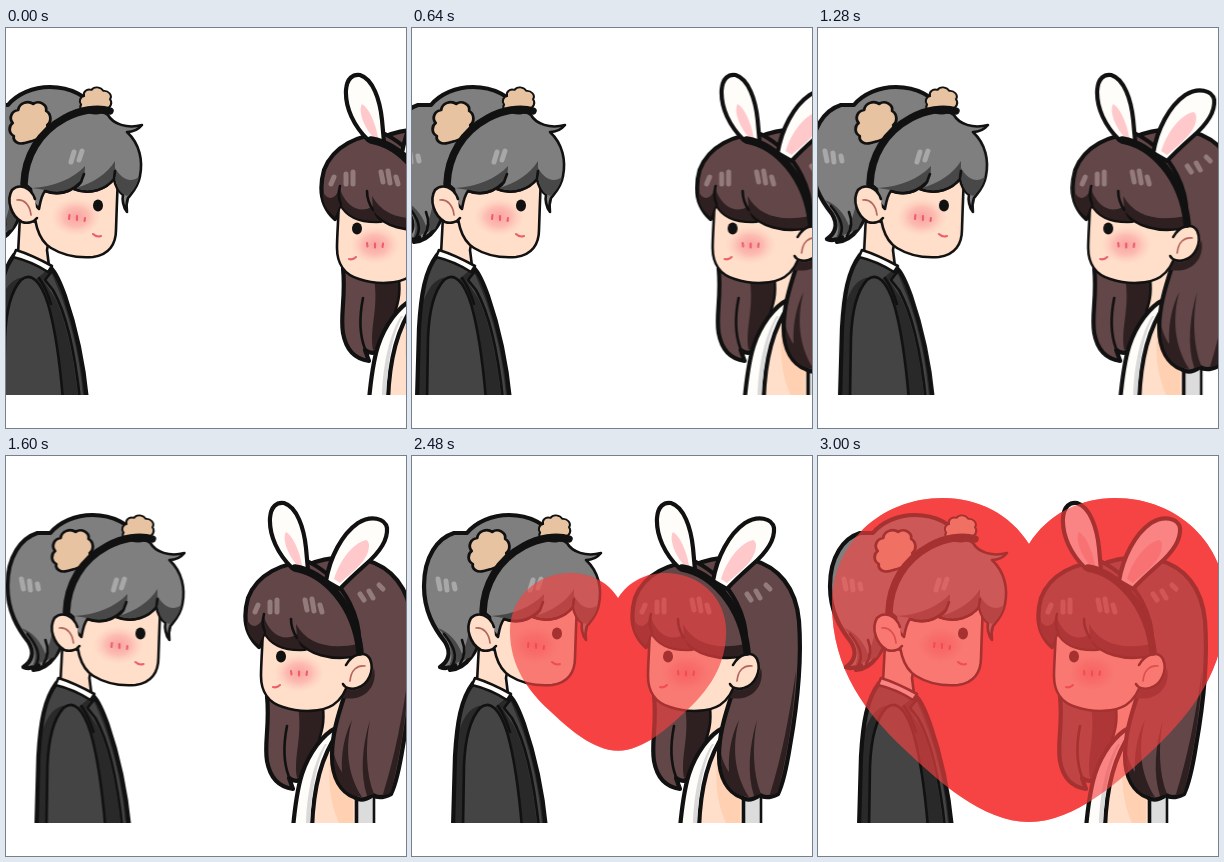
Write an HTML page that moves like this. It is 400 px wide and 400 px high and loops after 3680 ms.

```html
<!DOCTYPE html>
<html lang="en">
<head>
<meta charset="utf-8">
<title>Couple and heart</title>
<style>
  html, body { margin: 0; width: 100%; height: 100%; overflow: hidden; background: #fff; }
  svg { display: block; width: 100vw; height: 100vh; }
  .boy, .girl, .heart { animation: 3680ms infinite; }
  .boy { animation-name: boy; }
  .girl { animation-name: girl; }
  .heart { animation-name: heart; transform-origin: 200px 208px; fill: #f64343; }
  .veil { opacity: .65; }

  /* slide ends at 2000 ms, heart grows until 3000 ms, 40 ms per step */
  @keyframes boy {
    0% { transform: translateX(-51px); animation-timing-function: steps(50, end); }
    54.3478%, 100% { transform: translateX(2px); }
  }
  @keyframes girl {
    0% { transform: translateX(91px); animation-timing-function: steps(50, end); }
    54.3478%, 100% { transform: translateX(-4px); }
  }
  @keyframes heart {
    0%, 54.3477% { transform: scale(0); animation-timing-function: step-end; }
    54.3478% { transform: scale(.132); animation-timing-function: steps(25, end); }
    81.5217%, 100% { transform: scale(1); }
  }

  .ink { stroke: #111; stroke-width: 2.6; stroke-linejoin: round; stroke-linecap: round; }
  .bold { stroke-width: 4.2; }
  .line { fill: none; }
  .band { fill: none; stroke: #111; stroke-width: 7.5; stroke-linecap: round; }
  .skin { fill: #ffdfca; }
  .gray { fill: #7f7f7f; }
  .grayDark { fill: #484848; }
  .suit { fill: #444; }
  .suitDark { fill: #292929; }
  .brown { fill: #624648; }
  .brownDark { fill: #2e2021; }
  .tan { fill: #e8c3a2; }
  .white { fill: #fffdfa; }
  .pink { fill: #ffc9cc; }
  .shine { fill: none; stroke-width: 5; stroke-linecap: round; }
  .boy .shine { stroke: #a8a8a8; }
  .girl .shine { stroke: #937a7b; }
  .mark { fill: none; stroke: #ec5f68; stroke-width: 2.1; stroke-linecap: round; }
  .fold { fill: none; stroke: #b5655c; stroke-width: 1.7; stroke-linecap: round; }
</style>
</head>
<body>
<svg viewBox="0 0 400 400">
  <defs>
    <radialGradient id="blush">
      <stop offset="0" stop-color="#f77f88" stop-opacity=".65"/>
      <stop offset=".5" stop-color="#f98f93" stop-opacity=".45"/>
      <stop offset="1" stop-color="#ffb5ab" stop-opacity="0"/>
    </radialGradient>
    <clipPath id="floor"><rect width="400" height="367"/></clipPath>
    <path id="love" d="M211 88C192 58 160 42 125 42C62 42 14 88 14 148C14 215 50 258 84 291C120 325 165 366 211 366C257 366 302 325 338 291C372 258 408 215 408 148C408 88 360 42 297 42C262 42 230 58 211 88Z"/>
    <path id="fluff" d="M-5 21C-11 23-16 19-15 14C-20 11-20 4-16 1C-20-4-17-11-11-12C-10-19-2-22 3-18C8-22 16-18 15-11C20-8 20 0 16 3C18 8 15 12 11 13C8 18 2 19-5 21Z"/>
  </defs>

  <use href="#love" class="heart"/>

  <g clip-path="url(#floor)">
    <g class="boy">
      <!-- back hair -->
      <path class="gray ink bold" d="M40 77C24 82 10 100 10 130C10 155 20 172 31 186C37 196 35 205 26 211C31 213 36 212 41 209L36 214C45 213 52 208 57 201C62 195 64 188 68 180L150 90C132 66 114 59 95 59C78 59 62 66 53 77Z"/>
      <path class="grayDark" d="M24 172C36 184 41 198 35 210L57 201L67 180L58 160C55 178 52 190 48 198C44 186 35 176 24 172Z"/>
      <path class="ink line" d="M30 178C40 190 44 200 38 210M48 184C52 194 50 202 46 208"/>
      <path class="shine" d="M24 123L26 133M32 125L33 134M40 128L41 133"/>

      <!-- neck and suit -->
      <path class="skin ink" d="M65 188L63 226L94 238L92 222L96 200Z"/>
      <path class="suitDark ink bold" d="M59 227C47 243 43 266 41 300L39 372H132C129 340 121 300 110 268C105 254 101 245 96 240Z"/>
      <path class="suit" d="M60 230C52 240 48 256 46 272C54 250 66 246 80 252L92 242Z"/>
      <path class="suit ink" d="M49 372L50 310C51 284 55 264 66 252C76 243 86 254 93 276C100 300 105 336 108 372Z"/>
      <path class="suit" d="M100 270C111 292 119 330 123 368H128C125 330 116 294 106 268L97 246L88 252Z"/>
      <path class="ink line" d="M97 243L90 252L98 262C111 285 120 325 125 372M84 250C89 257 93 266 96 276"/>
      <path class="white ink" d="M61 222L58 229C71 232 82 237 93 244L97 238C86 232 74 226 61 222Z"/>

      <!-- face -->
      <path class="skin ink" d="M78 160C78 195 83 212 96 220C109 228 125 230 138 229C154 227 161 216 161 202C161.500 188 162 170 163 150L120 120Z"/>
      <ellipse cx="121" cy="189" rx="25" ry="19" fill="url(#blush)"/>
      <path class="mark" d="M114.500 187L114 191M122 188V192M130 190L129.500 193"/>
      <path class="mark" d="M138 206C140 208 143 209 146 208"/>
      <ellipse cx="143" cy="177.500" rx="5" ry="6" fill="#111"/>

      <!-- fringe -->
      <path class="gray ink" d="M70 156C72 128 86 102 115 88C130 81 146 82 153 87C158 96 172 101 187 97C183 102 178 104 172 104C185 116 188 133 185 148C183 160 176 166 173 170C171 176 171 179 172 184C168 179 167 171 168 167C163 163 160 157 159 151C152 160 136 168 119 161C122 159 125 156 126 154C116 164 104 168 90 163C86 168 85 176 84 181C78 176 76 168 76 161Z"/>
      <path class="grayDark" d="M77 160C98 159 118 151 130 138C130 147 128 152 126 154C116 163 104 166 90 162ZM121 160C138 155 152 146 160 133C160 141 160 147 159 150C152 159 136 166 121 160ZM160 140C167 152 176 155 184 149C182 159 176 165 172 168L168 166C163 162 160 156 160 140Z"/>
      <path class="ink line" d="M90 163C104 168 116 164 126 154L129 146M119 161C136 168 152 160 159 151L160 143"/>
      <path class="shine" d="M119 124L116 134M127 123L124 132"/>

      <!-- ear, band, fluffy ears -->
      <path class="skin ink" d="M80 171C76 159 64 155 57 162C51 172 56 188 67 194C73 196 79 194 82 190"/>
      <path class="fold" d="M62 172C69 171 75 177 76 187"/>
      <use href="#fluff" class="tan ink" transform="translate(75 94) scale(1.08 1)"/>
      <use href="#fluff" class="tan ink" transform="translate(141 73) rotate(25) scale(.8 .68)"/>
      <path class="band" d="M69 156C70 128 84 104 110 90C125 82 142 79 155 83"/>
    </g>

    <g class="girl">
      <!-- lock behind the shoulder -->
      <path class="brown ink bold" d="M246 240C249 268 243 288 246 305C249 322 258 331 272 333L268 322C277 329 284 322 288 312L306 280V240Z"/>
      <path class="brownDark" d="M277 250C282 282 272 300 276 322C283 320 287 313 289 309L304 284V250Z"/>
      <path class="ink line" d="M266 270C262 290 263 308 268 321"/>

      <!-- neck, dress, arm -->
      <path class="skin ink" d="M301 245C304 262 302 272 298 284L320 300L330 235Z"/>
      <path fill="#dcdcdc" class="ink" d="M336 330V372H353V330Z"/>
      <path class="skin ink" d="M313 276C300 296 292 330 290 372H335V300Z"/>
      <path fill="#ffd0b2" d="M310 298C306 322 309 348 318 367H332V320C322 316 314 308 310 298Z"/>
      <path class="white ink bold" d="M315 272C302 278 288 297 281 318C276 334 274 350 272 372H291C292 340 298 303 317 277Z"/>
      <path fill="#d9d9d9" d="M304 288C293 305 286 335 285 367H289C291 338 294 308 306 288Z"/>

      <!-- long hair -->
      <path class="brown ink bold" d="M278 113C300 101 325 99 345 104C370 111 388 131 391 165C394 205 390 245 382 290C378 315 374 330 370 338C362 342 356 342 352 339C345 344 338 345 333 341C320 336 311 322 311 300C311 280 316 262 324 238L326 200Z"/>
      <path class="brownDark" d="M388 215C381 262 374 300 362 338C366 339 368 338 370 336C378 305 386 260 388 215ZM331 264C324 290 326 318 341 341C322 340 312 322 313 298C315 306 318 312 321 316C320 298 323 280 331 264ZM349 264C344 290 345 318 353 338L346 340C339 318 341 290 349 264Z"/>
      <path class="brownDark" d="M318 230C334 240 348 232 353 212C357 230 344 246 322 242Z"/>
      <path class="shine" d="M339 138L343 144M348 135L352 142M358 129L362 133"/>

      <!-- face -->
      <path class="skin ink" d="M242 165C242 185 240 205 240 220C240 236 248 247 262 251C280 257 301 256 312 249C321 243 326 233 329 222L330 165L285 140Z"/>
      <ellipse cx="278" cy="217" rx="25" ry="19" fill="url(#blush)"/>
      <path class="mark" d="M270 215L270.500 218.500M278 215.500V219.500M286 215.500L285.500 219"/>
      <path class="mark" d="M252 231C255 232 257 231 259 229"/>
      <ellipse cx="260" cy="200.500" rx="5" ry="6" fill="#111"/>

      <!-- fringe -->
      <path class="brown ink bold" d="M288 106C262 106 236 118 227 142C222 160 224 178 238 191C239 185 241 180 244 176C250 188 264 194 284 193C279 190 277 186 276 182C286 197 310 205 337 199C343 165 325 125 288 106Z"/>
      <path class="brownDark" d="M226 164C231 173 238 172 243 160C246 168 245 174 243 177L238 189C229 182 225 174 226 164ZM244 164C251 180 264 186 276 178C277 186 279 190 283 193C262 194 249 187 244 176ZM275 168C286 188 308 194 337 188V199C310 204 286 197 276 182Z"/>
      <path class="ink line" d="M244 176C241 170 241 165 243 158M276 182C272 176 270 170 270 163"/>
      <path class="shine" d="M237 149L234 156M249 146V156M256 144V156M284 144L286 154M291 143L293 155M299 149L301 156"/>

      <!-- ear, band, rabbit ears -->
      <path class="skin ink" d="M325 209C331 198 344 194 349 203C354 215 347 229 336 232C330 234 324 232 322 228"/>
      <path class="fold" d="M344 210C336 209 330 214 329 225"/>
      <path class="white ink bold" d="M271 112C257 98 248 80 249 62C250 50 256 46 263 47C276 51 283 72 285 92L287 114Z"/>
      <path class="pink" d="M265 76C261 82 266 98 276 109L281 110C279 96 272 80 265 76Z"/>
      <path class="white ink bold" d="M305 125C309 101 321 78 337 67C350 59 364 62 366 72C367 84 358 97 344 109C335 117 326 125 319 133Z"/>
      <path class="pink" d="M345 84C332 87 319 104 313 123L319 127C330 117 343 108 347 96C349 89 348 85 345 84Z"/>
      <path class="band" d="M274 112C303 117 334 148 339 196"/>
    </g>
  </g>

  <g class="veil"><use href="#love" class="heart"/></g>
</svg>
</body>
</html>
```
